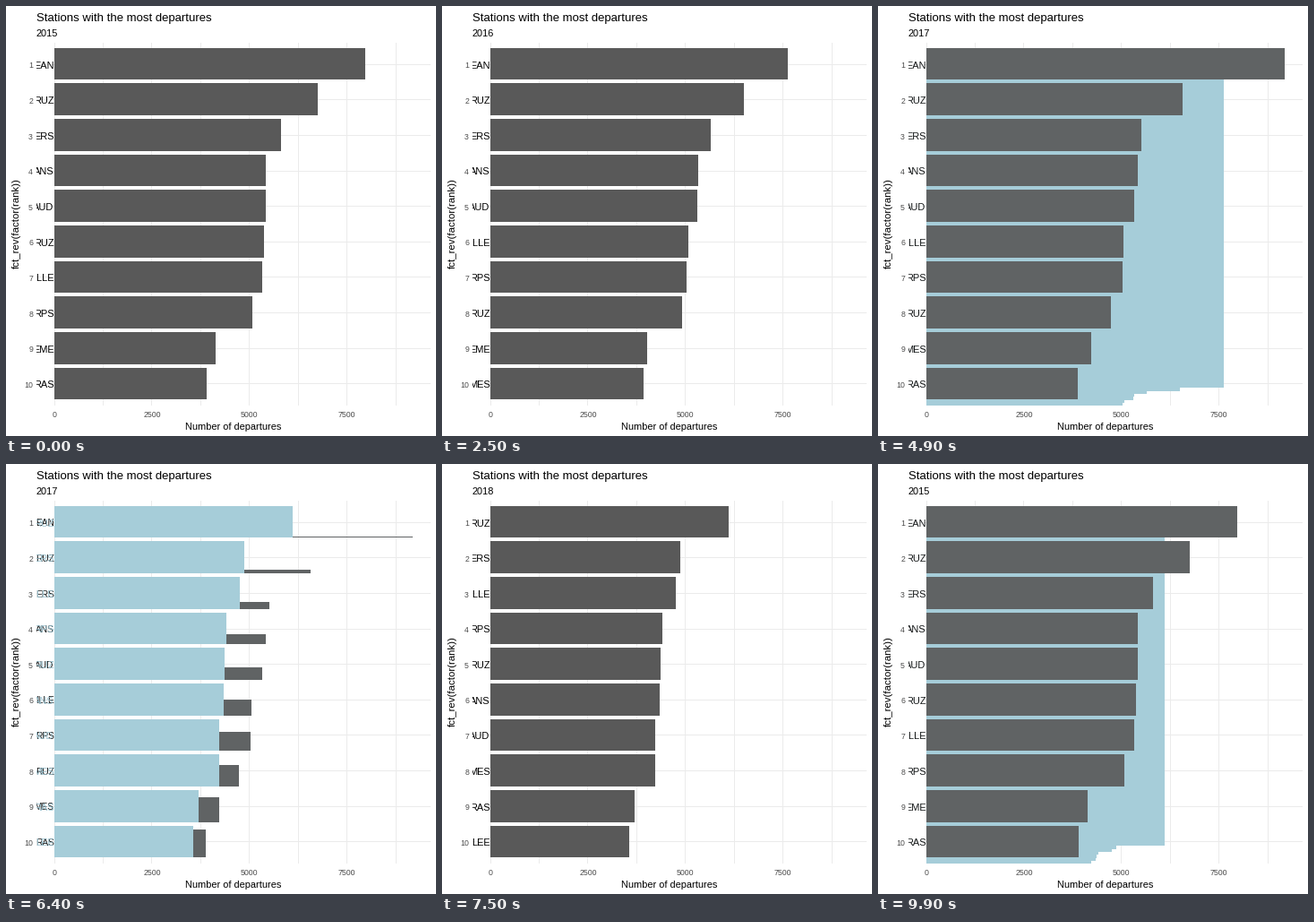
Write a matplotlib script that moves like this. It is 480x480 px and loops after 10 s.

```python
import math

import matplotlib.pyplot as plt
import numpy as np
from matplotlib.animation import FuncAnimation
from matplotlib.patches import Rectangle

SIZE, DPI = 480, 100
plt.rcParams["font.family"] = "Liberation Sans"

# Panel geometry in pixels, y pointing down
LEFT, RIGHT, TOP, BOTTOM = 34, 474, 41, 446
ZERO_X, HALF_TICK = 54, 54.45
FIRST_ROW, ROW_STEP = 65.1, 39.64
HALF_BAR = 0.45 * ROW_STEP
ROWS = [FIRST_ROW + ROW_STEP * r for r in range(10)]
BASE_Y = FIRST_ROW + ROW_STEP * 10

YEARS = ["2015", "2016", "2017", "2018"]
ENDS = [
    [401, 348, 307, 290, 290, 288, 286, 275, 234, 224],
    [386, 337, 300, 286, 285, 275, 273, 268, 229, 225],
    [454, 340, 294, 290, 286, 274, 273, 260, 238, 223],
    [320, 266, 261, 246, 244, 243, 238, 238, 215, 209],
]
LABELS = [
    "EAN RUZ ERS ANS AUD RUZ ILLE RPS EME RAS".split(),
    "EAN RUZ ERS ANS AUD ILLE RPS RUZ EME MES".split(),
    "EAN RUZ ERS ANS AUD ILLE RPS RUZ MES RAS".split(),
    "RUZ ERS ILLE RPS RUZ ANS AUD MES RAS LEE".split(),
]
# Last resting frame of each year and steps to the next one
MOVES = [(12, 13), (38, 12), (63, 12), (88, 12)]
FRAMES = 100

BAR = np.array([89, 89, 89]) / 255
TEXT = np.zeros(3)
PALE = np.array([173, 216, 230]) / 255
LABEL_PX = 11

TO_XYZ = np.array([[0.4124, 0.3576, 0.1805],
                   [0.2126, 0.7152, 0.0722],
                   [0.0193, 0.1192, 0.9505]])
WHITE = TO_XYZ.sum(axis=1)


def to_lab(rgb):
    lin = np.where(rgb > 0.04045, ((rgb + 0.055) / 1.055) ** 2.4, rgb / 12.92)
    t = TO_XYZ @ lin / WHITE
    x, y, z = np.where(t > 0.008856, np.cbrt(t), 7.787 * t + 16 / 116)
    return np.array([116 * y - 16, 500 * (x - y), 200 * (y - z)])


def to_rgb(lab):
    y = (lab[0] + 16) / 116
    f = np.array([y + lab[1] / 500, y, y - lab[2] / 200])
    t = np.where(f > 0.2069, f ** 3, (f - 16 / 116) / 7.787)
    lin = np.clip(np.linalg.solve(TO_XYZ, t * WHITE), 0, 1)
    return np.clip(np.where(lin > 0.0031308,
                            1.055 * lin ** (1 / 2.4) - 0.055, 12.92 * lin), 0, 1)


def blend(a, b, p):
    """Mix two colours in Lab space."""
    return to_rgb((1 - p) * to_lab(a) + p * to_lab(b))


def points(px):
    return px * 72 / DPI


fig = plt.figure(figsize=(SIZE / DPI, SIZE / DPI), dpi=DPI, facecolor="white")
ax = fig.add_axes([0, 0, 1, 1])
ax.set_xlim(0, SIZE)
ax.set_ylim(SIZE, 0)
ax.axis("off")
panel = Rectangle((LEFT, BOTTOM), RIGHT - LEFT, TOP - BOTTOM,
                  transform=ax.transData)


def box(x, y, w, h, color, z):
    patch = Rectangle((x, y), w, h, facecolor=color, linewidth=0,
                      antialiased=False, zorder=z)
    ax.add_patch(patch)
    patch.set_clip_path(panel)
    return patch


def write(x, y, text, px, color="black", ha="left", **kw):
    return ax.text(x, y, text, fontsize=points(px), color=color, ha=ha,
                   va="baseline", zorder=6, **kw)


def row_label(z):
    label = write(53.5, 0, "", LABEL_PX, ha="right", clip_on=True)
    label.set_zorder(z)
    label.set_clip_path(panel)
    return label


# Grid, axes and titles
GRID = "#EBEBEB"
for k in range(8):
    box(math.floor(ZERO_X + k * HALF_TICK), TOP, 1, BOTTOM - TOP, GRID, 1)
    if k % 2 == 0:
        write(ZERO_X + k * HALF_TICK, 459, str(k * 1250), 8.8, "#4D4D4D", "center")
for r, y in enumerate(ROWS):
    box(LEFT, math.floor(y), RIGHT - LEFT, 1, GRID, 1)
    write(30, y + 4.2, str(r + 1), 8.8, "#4D4D4D", "right")
write(34, 17, "Stations with the most departures", 13.15)
subtitle = write(34, 34, YEARS[0], 11)
write(254, 473, "Number of departures", 11, ha="center")
ax.text(15, 243, "fct_rev(factor(rank))", fontsize=points(11.4), rotation=90,
        rotation_mode="anchor", ha="center", va="baseline")

old_bars = [box(ZERO_X, 0, 0, 0, BAR, 2) for _ in ROWS]
new_bars = [box(ZERO_X, 0, 0, 0, BAR, 3) for _ in ROWS]
old_labels = [row_label(4) for _ in ROWS]
new_labels = [row_label(5) for _ in ROWS]


def timing(i):
    """Year index and progress towards the following year."""
    for s, (start, steps) in enumerate(MOVES):
        if i <= start:
            return s, 0.0
        if i < start + steps:
            return s, (i - start) / steps
    return 0, 0.0


def place_bar(bar, end, y0, y1, color):
    y0, y1 = sorted((math.floor(y0), math.floor(y1)))
    bar.set_bounds(ZERO_X, y0, end - ZERO_X, y1 - y0)
    bar.set_facecolor(color)


def place_label(label, text, y, color, scale=1.0):
    label.set_text(text)
    label.set_y(y + 0.36 * LABEL_PX * scale + 0.5)
    label.set_fontsize(points(LABEL_PX * max(scale, 0.1)))
    label.set_color(color)
    label.set_visible(scale > 0.12)


def draw(i):
    s, p = timing(i)
    following = (s + 1) % len(YEARS)
    subtitle.set_text(YEARS[following if p >= 0.5 else s])
    moving = p > 0
    bar_out, text_out = blend(BAR, PALE, p), blend(TEXT, PALE, p)
    bar_in, text_in = blend(PALE, BAR, p), blend(PALE, TEXT, p)
    for r, y in enumerate(ROWS):
        # Leaving bars keep their lower edge while the upper one sinks to zero
        upper = (1 - p) * (y - HALF_BAR) + p * BASE_Y
        place_bar(old_bars[r], ENDS[s][r], upper, y + HALF_BAR, bar_out)
        place_label(old_labels[r], LABELS[s][r], y, text_out, 1 - p)
        place_bar(new_bars[r], ENDS[following][r], y - HALF_BAR, y + HALF_BAR, bar_in)
        place_label(new_labels[r], LABELS[following][r], y, text_in)
        new_bars[r].set_visible(moving)
        new_labels[r].set_visible(moving)
    return []


anim = FuncAnimation(fig, draw, frames=FRAMES, interval=100, repeat=True,
                     repeat_delay=0, blit=False)
plt.show()
```
